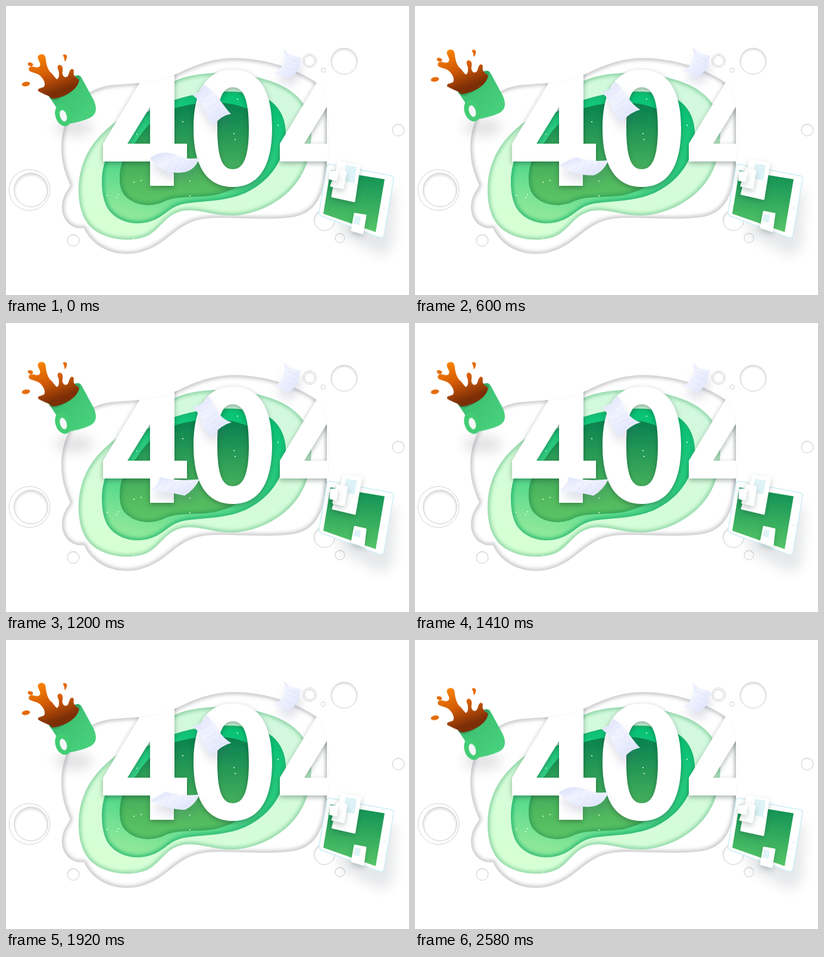
An HTML page for the animation above (2610 ms loop, 677 by 487 pixels).

```html
<!DOCTYPE html>
<html lang="en">
<head>
<meta charset="utf-8">
<title>404</title>
<style>
html, body { margin: 0; width: 100%; height: 100%; overflow: hidden; background: #fff; }
svg { display: block; width: 677px; height: 487px; }
.morph { d: var(--a); animation: morph 2610ms linear infinite; }
.cup { animation: rise 2610ms linear infinite; }
@keyframes morph { 0%, 100% { d: var(--a); } 50% { d: var(--b); } }
@keyframes rise { 0%, 100% { transform: translateY(0); } 50% { transform: translateY(-17px); } }
.edge { fill: none; stroke-width: 6; filter: url(#soft); }
.sheet { fill: url(#paper); }
.lines { fill: none; stroke: #cbd2f3; stroke-width: 1; opacity: .4; }
.papers { filter: drop-shadow(2px 12px 8px rgba(70, 80, 120, .17)); }
.card { fill: #fff; stroke: #fff; stroke-width: 3; stroke-linejoin: round;
  filter: drop-shadow(0 4px 5px rgba(20, 60, 50, .25)); }
.pane { fill: #def3f8; }
</style>
</head>
<body>
<svg viewBox="0 0 677 487">
<defs>
  <path id="outer" d="M93 240C93 185 125 138 180 133C235 128 245 132 290 113C330 93 360 86 395 88C450 91 500 112 525 132C545 150 545 240 538 280C533 320 520 350 480 356C440 361 400 357 360 357C310 356 295 372 268 393C240 415 215 420 190 417C160 412 140 395 131 374C112 378 94 362 94 340C94 320 103 312 108 302C98 280 93 262 93 240Z"/>
  <path id="pale" d="M122 305C124 250 155 212 205 181C245 157 265 130 300 120C345 108 400 112 440 125C485 139 513 167 513 210C513 258 500 292 468 319C440 342 405 354 375 353C345 352 320 341 298 345C268 351 262 373 240 386C215 399 170 396 145 375C128 360 121 335 122 305Z"/>
  <path id="mint" d="M161 295C161 255 185 210 225 186C260 164 300 149 345 146C390 141 428 147 447 162C463 175 471 196 470 218C468 260 444 293 408 312C375 330 330 328 300 333C274 338 268 354 245 362C215 373 182 362 169 338C163 325 161 312 161 295Z"/>
  <path id="deep" d="M191 292C190 262 204 243 219 228C240 192 270 172 310 166C355 158 400 164 424 185C443 203 449 236 434 262C415 292 385 311 350 319C315 324 287 319 265 330C240 341 214 335 200 320C193 312 191 302 191 292Z"/>
  <clipPath id="inOuter"><use href="#outer"/></clipPath>
  <clipPath id="inPale"><use href="#pale"/></clipPath>
  <clipPath id="inMint"><use href="#mint"/></clipPath>
  <clipPath id="inDeep"><use href="#deep"/></clipPath>
  <filter id="soft" x="-20%" y="-20%" width="140%" height="140%"><feGaussianBlur stdDeviation="3"/></filter>
  <filter id="blur" x="-60%" y="-60%" width="220%" height="220%"><feGaussianBlur stdDeviation="10"/></filter>
  <linearGradient id="paleFill" x1=".8" y1="0" x2=".3" y2="1">
    <stop stop-color="#d2f8df"/><stop offset="1" stop-color="#d6ffd5"/>
  </linearGradient>
  <linearGradient id="mintFill" x1=".75" y1="0" x2=".4" y2="1">
    <stop stop-color="#04c274"/><stop offset=".5" stop-color="#30cf82"/><stop offset="1" stop-color="#8ce799"/>
  </linearGradient>
  <linearGradient id="deepFill" x1=".55" y1="0" x2=".5" y2="1">
    <stop stop-color="#088250"/><stop offset=".75" stop-color="#50b85e"/><stop offset="1" stop-color="#5cc566"/>
  </linearGradient>
  <linearGradient id="screen" x1=".55" y1="0" x2=".45" y2="1">
    <stop stop-color="#0f9054"/><stop offset="1" stop-color="#58c768"/>
  </linearGradient>
  <linearGradient id="paper" x1="0" y1="0" x2="1" y2="1">
    <stop stop-color="#d8def9"/><stop offset=".4" stop-color="#f1f3ff"/><stop offset="1" stop-color="#dbe1fa"/>
  </linearGradient>
  <linearGradient id="coffee" x1=".2" y1="0" x2=".6" y2="1">
    <stop stop-color="#fb8500"/><stop offset=".45" stop-color="#d25a06"/><stop offset=".85" stop-color="#7c2e07"/>
  </linearGradient>
  <linearGradient id="mug" x1="0" y1="0" x2="1" y2="1">
    <stop stop-color="#37b86c"/><stop offset="1" stop-color="#4bd580"/>
  </linearGradient>
  <radialGradient id="dent" cy=".54" r=".54">
    <stop offset=".78" stop-color="#fff"/><stop offset="1" stop-color="#d9d9dc"/>
  </radialGradient>
</defs>

<!-- Background dents -->
<g fill="url(#dent)" stroke="#d2d2d5" stroke-width="1">
  <circle cx="568" cy="93" r="22"/>
  <circle cx="510" cy="92" r="11.5" fill="#fff"/><circle cx="510" cy="92" r="9"/>
  <circle cx="533" cy="108" r="3.7"/>
  <circle cx="659" cy="209" r="10"/>
  <circle cx="39.500" cy="310" r="34.500" fill="#fff"/><circle cx="42" cy="310" r="28.500"/>
  <circle cx="113" cy="395" r="10"/>
  <circle cx="535" cy="361" r="17.500"/>
  <circle cx="561" cy="391" r="8"/>
</g>

<!-- Layered cut-out -->
<g clip-path="url(#inOuter)">
  <use href="#outer" fill="#fff"/><use href="#outer" class="edge" stroke="#bcbcc0"/>
  <g clip-path="url(#inPale)">
    <use href="#pale" fill="url(#paleFill)"/><use href="#pale" class="edge" stroke="#7fcd9a"/>
  </g>
  <g clip-path="url(#inMint)">
    <use href="#mint" fill="url(#mintFill)"/><use href="#mint" class="edge" stroke="#1cb36c"/>
  </g>
  <g clip-path="url(#inDeep)">
    <use href="#deep" fill="url(#deepFill)"/><use href="#deep" class="edge" stroke="#14874b" opacity=".6"/>
  </g>
  <path fill="none" stroke="#e5ffe9" stroke-width="2.200" stroke-linecap="round" d="M220 216h0M297 195h0M389 157h0M383 215h0M385 225h0M215 297h0M227 294h0M255 288h0M170 319h0M189 318h0M186 323h0M309 320h0M309 295h0M214 391h0M457 201h0"/>
  <g fill="#fff" fill-rule="evenodd" style="filter:drop-shadow(0 3px 4px rgba(20,50,40,.38))">
    <path id="four" d="M238 107H283V232H304V262H282V303H242V262H163V232ZM242 170L204 232H242Z"/>
    <path d="M381 107C426 107 447 144 447 206C447 268 426 305 381 305C336 305 315 268 315 206C315 144 336 107 381 107ZM381 137C362 137 355 160 355 206C355 252 362 275 381 275C400 275 408 252 408 206C408 160 400 137 381 137Z"/>
    <use href="#four" x="297"/>
  </g>
</g>

<!-- Mug -->
<ellipse cx="114" cy="204" rx="32" ry="14" fill="#50505c" opacity=".17" filter="url(#blur)"/>
<g class="cup">
  <path fill="url(#mug)" d="M72 152C80 137 105 119 121 117Q125 117 127 121L147 158C153 171 153 182 142 188C130 194 115 197 103 199Z"/>
  <path fill="#31a566" d="M72 151C82 133 107 117 122 117C131 125 112 148 84 159Q73 159 72 151Z"/>
  <g transform="rotate(-18 96 184)">
    <ellipse cx="96" cy="184" rx="13" ry="19" fill="#42cd74"/>
    <ellipse cx="96" cy="185" rx="5.500" ry="10" fill="#f6f7f8"/>
  </g>
  <g transform="translate(1.500 -.5)">
    <path fill="url(#coffee)" d="M76 157C70 150 62 150 53 144C50 140 56 139 62 137C66 132 62 124 56 118C50 113 42 113 38 110C34 104 40 101 46 103C52 105 56 104 56 98C54 92 50 88 53 84C57 80 64 81 65 88C66 98 68 106 73 112C77 115 81 122 84 124C88 122 88 116 87 110C83 103 86 99 90 100C95 102 94 108 93 113C94 120 98 122 102 119C105 115 104 110 108 107C112 106 113 109 112 113C112 120 118 122 121 125C121 140 98 155 76 157Z"/>
    <g fill="#e56b08">
      <ellipse cx="32" cy="132" rx="7" ry="3.800" transform="rotate(-10 32 132)"/>
      <ellipse cx="39.500" cy="99" rx="4.500" ry="3" transform="rotate(20 40 99)"/>
      <path d="M94 83Q100 80 101 86Q100 92 97 94Q97 88 94 83Z"/>
    </g>
  </g>
</g>

<!-- Flying sheets -->
<g class="papers">
  <path class="sheet morph" style="--a:path('M466 73Q476 83 496 87C495 104 488 116 474 123Q464 115 450 113C466 104 472 90 466 73Z');--b:path('M467 66Q476 78 495 80C490 98 489 108 472 118Q462 108 449 107C466 98 472 82 467 66Z')"/>
  <path class="lines morph" style="--a:path('M473 87Q480 92 490 93M472 95Q479 100 488 101M468 103Q475 107 483 109');--b:path('M473 80Q480 85 490 87M472 89Q478 94 487 95M467 98Q474 103 481 105')"/>
  <path class="sheet morph" style="--a:path('M313 150Q327 147 332 133C352 142 358 160 378 182Q362 184 350 200C335 190 335 165 313 150Z');--b:path('M312 141Q330 140 340 121C352 132 350 158 379 166Q360 172 345 190C325 178 330 150 312 141Z')"/>
  <path class="lines morph" style="--a:path('M330 154Q339 150 343 146M335 161Q344 158 350 153M338 171Q348 167 356 162M342 181Q352 175 363 172M347 190Q356 182 370 180');--b:path('M326 147Q337 145 344 135M329 155Q340 152 347 143M331 165Q343 160 351 152M335 175Q347 167 358 160M342 183Q353 172 367 166')"/>
  <path class="sheet morph" style="--a:path('M242 256Q262 242 284 250Q302 260 325 256Q318 276 300 280Q262 286 242 256Z');--b:path('M243 284Q256 277 256 261Q290 268 325 264Q316 282 300 292Q272 284 243 284Z')"/>
  <path class="lines morph" style="--a:path('M282 254Q278 269 270 275M292 259Q288 272 281 277M302 261Q298 273 291 278M312 261Q307 273 300 277');--b:path('M270 267Q267 277 259 281M283 269Q279 279 271 283M296 270Q291 281 283 285M309 270Q304 282 294 288')"/>
</g>

<!-- Tablet and cards -->
<path d="M560 325L655 310L650 405L632 422L560 385Z" fill="#44505c" opacity=".13" filter="url(#blur)"/>
<path d="M546 267L647 286Q652 287 651 292L635 386Q634 392 627 390L530 354Q525 352 526 347L539 271Q540 266 546 267Z" fill="#fff" stroke="#cceef5" stroke-width="1.500"/>
<path d="M545 277L636 292L621 381L533 350Z" fill="url(#screen)"/>
<circle cx="636" cy="341" r="2" fill="#fff" stroke="#e4eff2"/>
<path class="card morph" style="--a:path('M558 263L594 269L585 329L548 321Z');--b:path('M569 257L597 260L586 321L549 312Z')"/>
<path class="pane morph" style="--a:path('M571 268L589 271L585 299L567 295Z');--b:path('M571 262L590 265L585 288L567 284Z')"/>
<path class="card morph" style="--a:path('M556 276L571 280L566 307L546 303Z');--b:path('M557 274L573 276L568 307L550 303Z')"/>
<path class="card morph" style="--a:path('M545 279L557 280L555 293L544 291Z');--b:path('M546 281L556 280L554 298L545 296Z')"/>
<path class="card morph" style="--a:path('M586 350L604 353L599 383L581 378Z');--b:path('M586 343L604 347L601 375L581 368Z')"/>
<path class="pane morph" style="--a:path('M586 353L596 355L594 369L584 367Z');--b:path('M587 347L596 349L594 361L584 358Z')"/>
</svg>
</body>
</html>
```
